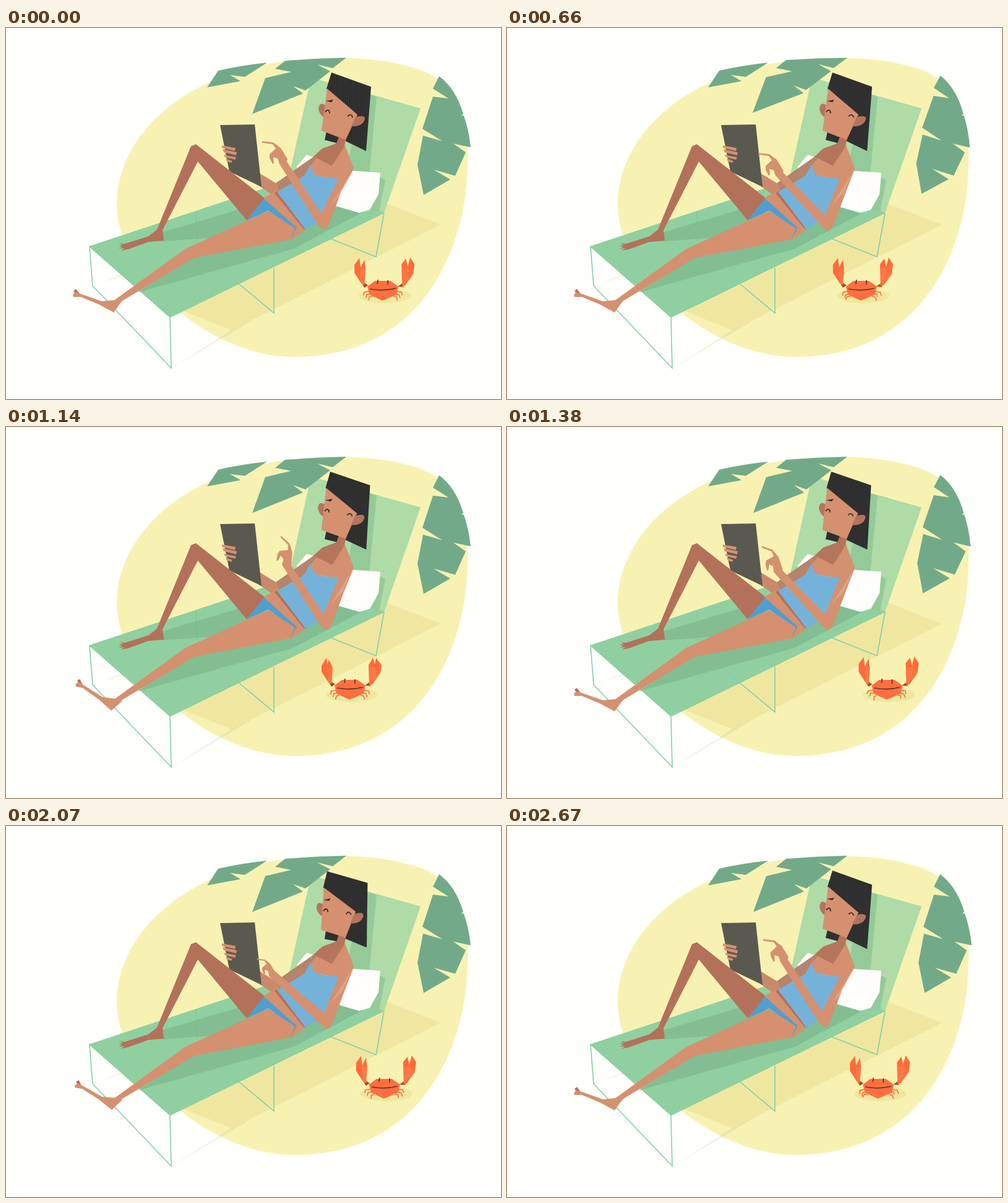
Recreate the animation shown at these times as an HTML page with a canvas. Size 800 px wide and 600 px high, loop 2700 ms.

```html
<!DOCTYPE html>
<html lang="en">
<head>
<meta charset="utf-8">
<title>Reading in the sun</title>
<style>
html, body { margin: 0; width: 100%; height: 100%; overflow: hidden; background: #fffffb; }
canvas { display: block; width: 800px; height: 600px; }
</style>
</head>
<body>
<canvas id="stage" width="800" height="600"></canvas>
<script>
const LOOP = 2700;
const ctx = document.getElementById('stage').getContext('2d');

const SKIN = '#d59070', DARK_SKIN = '#b3715a', PALM = '#72aa89', HAIR = '#2c2c2c';
const LINE = '#82cfad', SHADE = 'rgba(195,175,75,.17)', CRAB = '#ff6b3a';

const paths = {};
const pathOf = d => paths[d] || (paths[d] = new Path2D(d));
const fill = (color, d) => { ctx.fillStyle = color; ctx.fill(pathOf(d)); };

function stroke(color, width, d) {
  ctx.strokeStyle = color;
  ctx.lineWidth = width;
  ctx.stroke(pathOf(d));
}

function poly(color, points) {
  ctx.fillStyle = color;
  ctx.beginPath();
  points.forEach(([x, y]) => ctx.lineTo(x, y));
  ctx.closePath();
  ctx.fill();
}

function group(x, y, degrees, draw) {
  ctx.save();
  ctx.translate(x, y);
  ctx.rotate(degrees * Math.PI / 180);
  ctx.translate(-x, -y);
  draw();
  ctx.restore();
}

const ease = u => (1 - Math.cos(Math.PI * u)) / 2;

// Rises from 0 to 1 and falls back between two times.
function bump(t, from, to) {
  return t <= from || t >= to ? 0 : Math.sin(Math.PI * (t - from) / (to - from)) ** 2;
}

// Keys are [time, value, value, ...] in order of time.
function tween(keys, t) {
  let i = 0;
  while (i < keys.length - 2 && t >= keys[i + 1][0]) i++;
  const a = keys[i], b = keys[i + 1];
  const u = ease(Math.min(1, Math.max(0, (t - a[0]) / (b[0] - a[0]))));
  return a.slice(1).map((v, k) => v + (b[k + 1] - v) * u);
}

// Wrist x, y, hand angle, hand scale, elbow x, y
const REST = [446, 215, 0, 1, 509, 300];
const TAP = [438, 234, 0, 1, 514, 303];
const LIFT = [452, 221, 36, 1, 513, 303];
const SWIPE = [436, 231, 13, 1, 514, 303];
const POINT = [446, 213, 53, 1, 506, 299];
const PRESS = [428, 237, 0, .7, 514, 303];
const ARM_KEYS = [
  [0, ...REST], [120, ...REST], [420, ...TAP], [700, ...TAP], [1080, ...LIFT], [1150, ...LIFT],
  [1380, ...SWIPE], [1470, ...TAP], [1680, ...POINT], [1750, ...POINT],
  [2040, ...PRESS], [2110, ...PRESS], [2400, ...REST], [2700, ...REST]
];
const HEAD_KEYS = [[0, 0], [720, 0], [1080, -1], [1420, -1], [1680, 3.6], [1750, 3.6],
  [2020, -3.6], [2110, -3.6], [2420, 0], [2700, 0]];
const CRAB_KEYS = [[-214, -53], [89, 13], [460, 13], [763, -53], [1145, -53], [1448, 13],
  [1993, 13], [2296, -53], [2486, -53], [2789, 13]];

function drawPalms(t) {
  fill(PALM, 'M325 96L343 69Q382 60 422 56L386 79L362 76L379 86Z');
  group(540, 50, 1.7 * (bump(t, 570, 970) + bump(t, 1500, 1950)), () =>
    fill(PALM, 'M435 66L451 53Q500 49 550 48L528 65L503 59L524 70L484 101L464 94L480 106L398 139L419 81L461 71Z'));
  group(735, 90, 1.6 * (bump(t, 430, 880) + bump(t, 1260, 1710)), () =>
    fill(PALM, 'M700 78Q727 98 739 139L736 141L740 142Q748 165 751 193L723 187L743 201L726 239L691 229' +
      'L718 245L675 270L665 221L674 174L705 183L673 163L690 111L715 114L690 98Z'));
}

function drawChair() {
  fill(SHADE, 'M280 455L365 489L703 318L615 284L433 380Z');
  fill('rgba(190,180,150,.2)', 'M268 550L365 488L400 472Z');
  fill('rgba(190,180,150,.12)', 'M155 412L200 391L206 397Z');
  fill('#aedba6', 'M493 80L670 130L611 299L520 290L455 250Z');
  fill('#94ca97', 'M575 104L599 111L587 236L550 232Z');
  fill('#90d0a0', 'M134 353L460 245L530 260L611 299L265 468Z');
  fill('#94ca97', 'M598 238L613 246L603 297L585 294Z');
  fill('#82be92', 'M250 331L395 288L425 303L350 338L254 345Z');
  fill('#82be92', 'M212 428L300 372L465 335L520 290L560 270L578 297L465 357Z');
  stroke(LINE, 1.6, 'M135 353L140 417L267 550L265 468M433 388V461L348 390M611 299L598 370L505 333');
  stroke('rgba(115,185,140,.5)', 1, 'M307 297L309 345');
  stroke('#83cb9e', 1, 'M134 353L265 468L611 299');
  fill('#fffefb', 'M486 205L470 224V246L530 287L571 299L588 294L602 269L605 234L560 231Z');
}

function drawBody(t) {
  fill('#b5846a', 'M513 197L436 251L440 266L505 225Z');
  fill('#c98a6c', 'M410 235L438 252L442 264L432 271L410 256Z');
  fill('#5a5950', 'M346 157L402 156L413 257L361 232Z');
  fill(SKIN, 'M349 190L371 194L370 199L349 194ZM350 196L373 201L372 206L352 201Z' +
    'M352 205L372 209L370 213L354 209ZM355 211L366 215L364 218L357 216Z');

  fill(DARK_SKIN, 'M299 191L307 188L418 275L389 311L310 216L253 327L255 344L230 346L197 358L186 360' +
    'L191 356L182 357L188 354L182 352L189 351L184 348L192 349L230 337L244 326Z');
  fill(SKIN, 'M416 275L440 261L484 326L461 343Z');
  fill(DARK_SKIN, 'M434 267L439 263L485 326L481 325Z');
  fill('#4f9fd0', 'M417 276L389 311L424 295L466 325L459 343L470 323Z');
  fill(SKIN, 'M290 357L424 296L467 324L459 342L303 372L185 443L174 449L174 441Z');

  group(178, 443, 13.2 * (bump(t, 900, 1380) + .95 * bump(t, 1760, 2240)), () => {
    fill(DARK_SKIN, 'M109 425L113 422L119 430L114 431Z');
    fill(SKIN, 'M188 441L176 440L155 442L118 429L111 427L110 430L108 431L109 435L121 435L150 447L174 460L184 446Z');
  });

  fill('#75b2d9', 'M438 265L482 239L492 221L500 237L514 241L542 243L521 303L484 326Z');
  fill(SKIN, 'M546 185L562 227L542 244L514 241L498 237L493 221L502 211Z');
  fill('#b5755d', 'M534 174L550 179L546 193L527 223L497 208L511 195L533 187Z');
}

function drawHead(t) {
  group(541, 183, tween(HEAD_KEYS, t)[0], () => {
    const hair = 'M526 72L590 95L582 199L549 183L550 150L518 98ZM518 167L538 176L534 186L515 181Z';
    fill(HAIR, hair);
    ctx.save();
    ctx.clip(pathOf(hair));
    ctx.fillStyle = 'rgba(255,255,255,.05)';
    for (let x = 514; x < 592; x += 3) ctx.fillRect(x, 70, 1, 130);
    ctx.restore();
    fill('#b5755d', 'M518 126Q506 117 505 131Q507 142 515 145Z');
    fill(SKIN, 'M519 98L568 140L549 181L510 166Z');
    fill('#b5755d', 'M565 144Q580 140 580 147Q577 160 558 159Z');
    fill(HAIR, 'M517 118L529 116L526 120Z');
    stroke('#3a302c', 1.8, 'M516 136Q518 132 521 133Q523 134 523 138M552 143Q555 139 558 141Q560 142 560 145');
  });
}

const HAND = 'M-32 -32L-14 -30L-2 -21L9 -3L5 6L-4 5L-7 -4L-14 -6L-13 3L-15 5L-20 -5L-20 -11L-10 -20L-15 -27L-32 -29.5Z';

function drawArm(t) {
  const [wx, wy, angle, scale, ex, ey] = tween(ARM_KEYS, t);
  const dx = ex - wx, dy = ey - wy, len = Math.hypot(dx, dy);
  const nx = dy / len * 6, ny = -dx / len * 6;
  poly(SKIN, [
    [wx - nx, wy - ny], [wx + nx, wy + ny], [ex, ey], [538, 243], [548, 225], [562, 228],
    [ex + 33, ey - 36], [ex + 14, ey + 15], [ex + 9, ey + 24], [ex + 3, ey + 25], [ex - 5, ey + 18]
  ]);
  fill('rgba(255,235,210,.2)', 'M560 231L544 267L525 286Z');
  ctx.save();
  ctx.translate(wx, wy);
  ctx.rotate(angle * Math.PI / 180);
  ctx.scale(scale, scale);
  fill(SKIN, HAND);
  ctx.restore();
}

function drawLegs(step) {
  ctx.strokeStyle = CRAB;
  ctx.lineWidth = 1.6;
  ctx.beginPath();
  for (const side of [-1, 1]) {
    for (let i = 0; i < 3; i++) {
      const sway = step * Math.cos(i * 2.1 + side);
      const px = 609 + side * (23 - 3 * i), py = 426 + 4 * i;
      ctx.moveTo(px, py);
      ctx.lineTo(px + side * (7 - i) + sway * .4, py + 1 + sway * .4);
      ctx.lineTo(px + side * (8.5 - i) + sway, py + 6.5 + sway * .7);
    }
  }
  ctx.stroke();
}

function drawCrab(t) {
  const x = tween(CRAB_KEYS, t)[0];
  const snap = bump(t, 800, 1000) + bump(t, 1040, 1240) + bump(t, 2290, 2490);
  const step = 2.5 * Math.sin((x - 13) / 66 * Math.PI * 5);
  ctx.save();
  ctx.translate(x, 0);
  ctx.fillStyle = SHADE;
  ctx.beginPath();
  ctx.ellipse(612, 433, 42, 12, 0, 0, 2 * Math.PI);
  ctx.fill();
  drawLegs(step);
  fill('#b8420f', 'M572 408L585 416L579 420ZM633 418L643 411L642 419Z');
  poly(CRAB, [[574, 413], [563, 396], [563, 383 + 3 * snap], [571, 372 + snap], [573 - snap, 387 - 3 * snap],
    [579 - 4 * snap, 375 + snap], [581, 390], [579, 416]]);
  poly(CRAB, [[640, 418], [639, 382 + 3 * snap], [646, 373], [649, 386 - 2 * snap],
    [653 - 2 * snap, 371 + 2 * snap], [660, 382 + 3 * snap], [658, 398], [645, 416]]);
  fill('rgba(255,140,80,.35)', 'M574 413L572 389L581 390L579 416ZM640 418L639 389L649 389L658 398Z');
  fill('#ff6e3f', 'M584 418L596 409H621L634 418L631 431L608 441L587 431Z');
  stroke('#563b32', 1.7, 'M601 407L600 414M617 408V415M588 422Q609 426 630 421');
  ctx.restore();
}

function draw(t) {
  ctx.fillStyle = '#fffffb';
  ctx.fillRect(0, 0, 800, 600);
  fill('#f7f2b2', 'M179 285C179 185 270 85 430 57C500 46 590 44 650 62C738 80 752 165 745 240' +
    'C742 330 690 532 465 532C330 532 179 400 179 285Z');
  drawChair();
  drawPalms(t);
  drawBody(t);
  drawHead(t);
  drawArm(t);
  drawCrab(t);
}

const start = performance.now();
function frame() {
  draw((performance.now() - start) % LOOP);
  requestAnimationFrame(frame);
}
frame();
</script>
</body>
</html>
```
